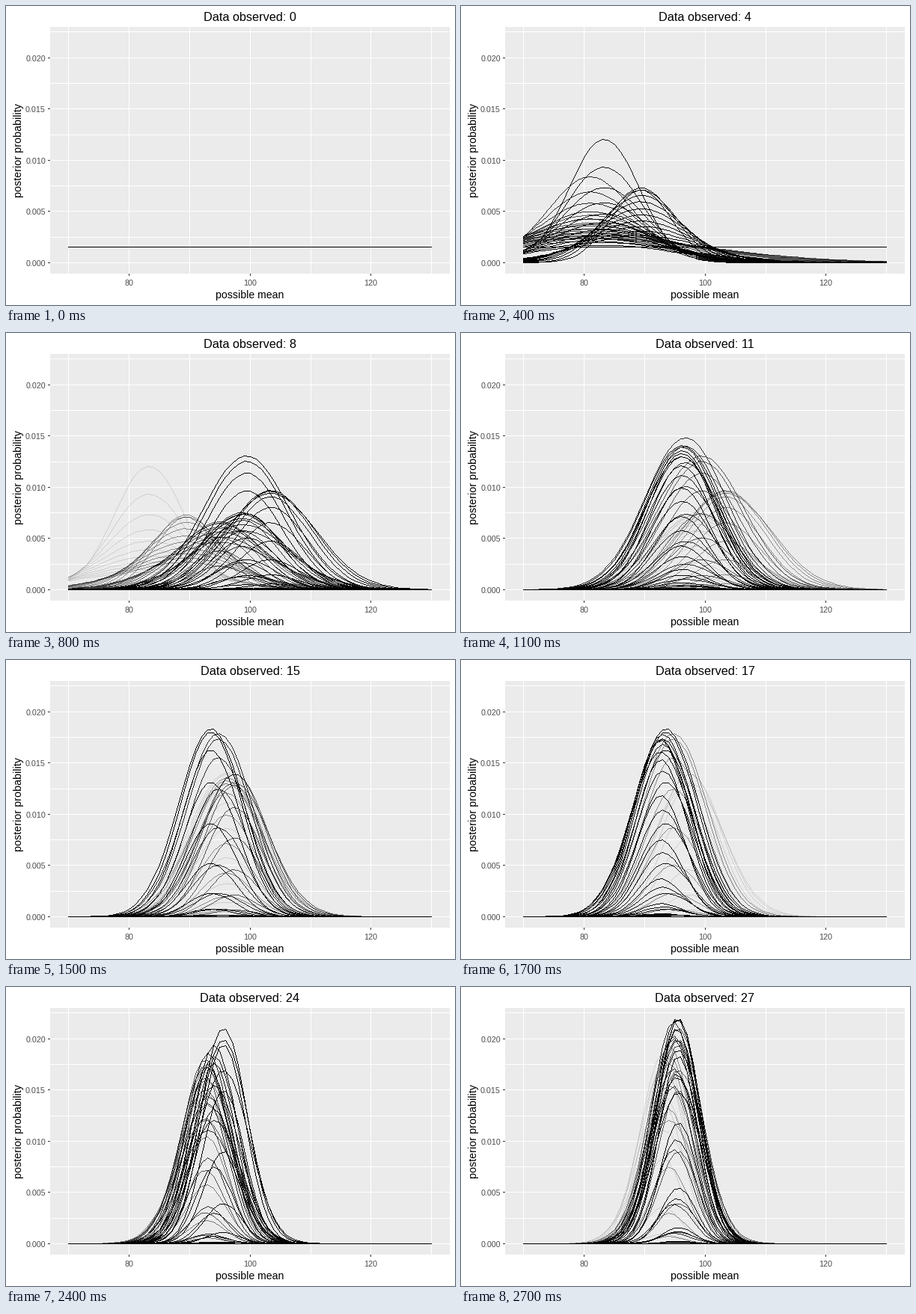
A matplotlib script for the animation above (2800 ms loop, 600 px wide and 400 px high).

```python
import numpy as np
import matplotlib.pyplot as plt
from matplotlib.animation import FuncAnimation
from matplotlib.patches import Rectangle

W, H, DPI = 600, 400, 72
FRAMES, INTERVAL = 28, 100
WAKE = 5

# Running mean of the sample after each observation
MEANS = [81, 81, 83.3, 89.4, 95, 98.7, 103.4, 99.4, 96.75, 96.2, 96.1, 97.4,
         94.8, 93.55, 93.05, 92.7, 92.4, 92.8, 92.6, 93.1, 94.1, 95.6, 94.85,
         95.35, 95.6]

mu = np.arange(70, 131)
sigma = np.arange(10, 21)[:, None]


def px(value):
    return np.floor(83.8 + (value - 70) * 485 / 60)


def py(prob):
    return np.floor(343.3 - 13703 * prob)


def posterior(n, mean, ss):
    """Grid posterior over (sigma, mu) with a flat prior."""
    log_p = -n * np.log(sigma) - (ss + n * (mu - mean) ** 2) / (2 * sigma ** 2)
    p = np.exp(log_p - log_p.max())
    return p / p.sum()


def trace(row):
    """Flat pixel indices of a hard-edged, one pixel wide polyline."""
    x, y = px(mu), py(row)
    steps = np.maximum(np.abs(np.diff(x)), np.abs(np.diff(y))).astype(int)
    at = np.concatenate([[0], np.cumsum(steps)])
    t = np.arange(at[-1] + 1)
    col = np.floor(np.interp(t, at, x) + 0.5).astype(int)
    line = np.floor(np.interp(t, at, y) + 0.5).astype(int)
    return np.unique(line * W + col)


def curves(n, mean, ss):
    return [trace(row) for row in posterior(n, mean, ss)]


def all_states():
    states = [curves(0, 0, 0)]
    ss, last = 0, MEANS[0]
    for n, mean in enumerate(MEANS, 1):
        ss += n * (n - 1) * (mean - last) ** 2
        states.append(curves(n, mean, ss))
        last = mean
    return states


STATES = all_states()


def state_at(frame):
    # The posterior rests for one step at 15 and again at 20
    return STATES[frame - (frame >= 15) - (frame >= 20)]


plt.rcParams["font.family"] = "Liberation Sans"
fig = plt.figure(figsize=(W / DPI, H / DPI), dpi=DPI, facecolor="white")
ax = fig.add_axes([0, 0, 1, 1])
ax.axis("off")

ink = np.zeros((H, W, 4))
layer = ax.imshow(ink, extent=(0, W, H, 0), aspect="auto",
                  interpolation="nearest", zorder=2)
ax.set_xlim(0, W)
ax.set_ylim(H, 0)


def rule(x, y, color):
    ax.plot(x, y, color=color, lw=1, antialiased=False, snap=False,
            solid_capstyle="butt", zorder=1)


def label(x, y, text, size, color="black", ha="center", **kw):
    return ax.text(x, y, text, fontsize=size, color=color, ha=ha,
                   va="baseline", **kw)


LEFT, RIGHT, TOP, BOTTOM = 59, 593, 28, 358
ax.add_patch(Rectangle((LEFT, TOP), RIGHT - LEFT, BOTTOM - TOP,
                       facecolor="#EBEBEB", lw=0, antialiased=False, zorder=0))

for v in range(70, 131, 10):
    x = px(v) + 0.5
    rule([x, x], [TOP, BOTTOM], "white")
    if v % 20 == 0:
        rule([x, x], [BOTTOM, BOTTOM + 3], "#333333")
        label(x, 374, str(v), 10.8, "#4D4D4D")

for k in range(10):
    v = k * 0.0025
    y = py(v) + 0.5
    rule([LEFT, RIGHT], [y, y], "white")
    if k % 2 == 0:
        rule([LEFT - 3, LEFT], [y, y], "#333333")
        label(53, y + 4.5, f"{v:.3f}", 10.8, "#4D4D4D", ha="right")

label(326, 391, "possible mean", 14.1)
label(21, 193.5, "posterior probability", 14.2, rotation=90,
      rotation_mode="anchor")
title = label(326, 20, "", 16.2)


def draw(frame):
    cover = np.zeros(H * W)
    for past in range(max(0, frame - WAKE), frame + 1):
        alpha = 1 - ((frame - past) / 5.4) ** 1.8
        for pixels in state_at(past):
            cover[pixels] += alpha * (1 - cover[pixels])
    ink[..., 3] = cover.reshape(H, W)
    layer.set_data(ink)
    title.set_text(f"Data observed: {frame}")
    return layer, title


anim = FuncAnimation(fig, draw, frames=FRAMES, interval=INTERVAL, repeat=True)
plt.show()
```
